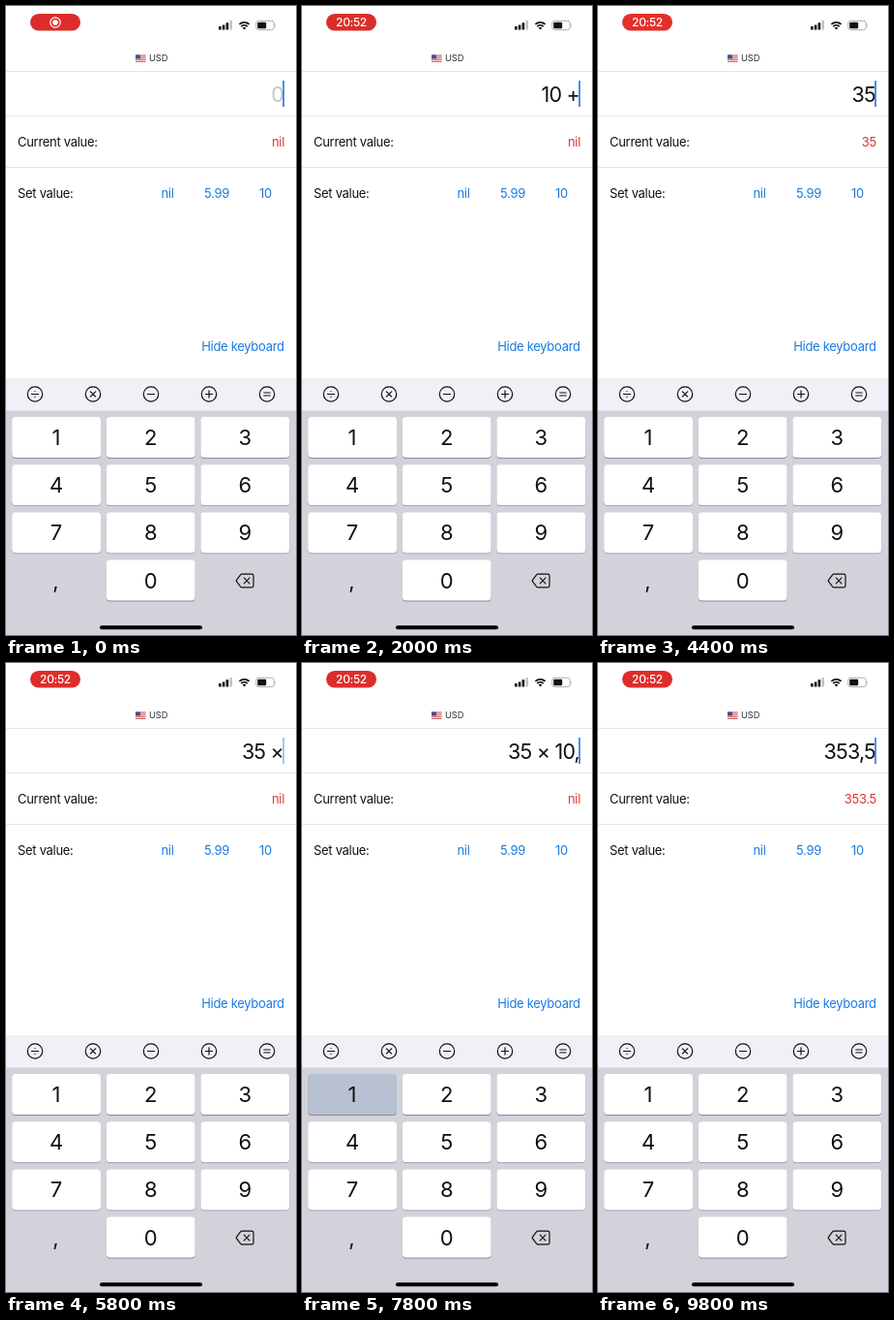
An HTML page that plays this animation: 300 by 649 pixels, repeating every 10 s.

```html
<!DOCTYPE html>
<html lang="en">
<head>
<meta charset="utf-8">
<title>Currency field</title>
<style>
  html, body { margin: 0; width: 100%; height: 100%; overflow: hidden; background: #fff; }
  svg { display: block; width: 100%; height: 100%; }
  text { font: 13px Inter, "Liberation Sans", sans-serif; letter-spacing: -.3px; fill: #111; }
  .end { text-anchor: end; }
  .mid, .key { text-anchor: middle; }
  .link { fill: #187be0; }
  .red { fill: #dd3530; }
  #amount { font-size: 21.5px; letter-spacing: -.8px; }
  .key { font-size: 22px; letter-spacing: 0; }
  #clock { font-size: 12px; font-weight: 500; fill: #fff; }
  .icon { fill: none; stroke: #111; stroke-width: 1.2; stroke-linecap: round; stroke-linejoin: round; }
</style>
</head>
<body>
<svg viewBox="0 0 300 649">
  <rect id="pill" x="25" y="8" width="52" height="17.5" rx="8.75"/>
  <g id="recording">
    <circle cx="51" cy="17" r="5.2" fill="none" stroke="#fff" stroke-width="1.2"/>
    <circle cx="51" cy="17" r="2.8" fill="#fff"/>
  </g>
  <text id="clock" class="mid" x="51" y="21.3">20:52</text>

  <g fill="#111">
    <path d="M220 21h2.6v3.5h-2.6zM223.8 19.4h2.6v5.1h-2.6zM227.6 17.2h2.6v7.3h-2.6z"/>
    <path d="M231.4 15h2.6v9.5h-2.6z" fill="#c4c4c6"/>
    <path d="M246.5 24.6l-1.9-2a2.8 2.8 0 0 1 3.8 0z"/>
    <rect x="260.2" y="16.7" width="9" height="6.6" rx="1.2"/>
    <path d="M278.3 18.4q1.6 1.6 0 3.2z" fill="#999"/>
  </g>
  <g fill="none" stroke="#111">
    <path d="M241.4 18.9a7.4 7.4 0 0 1 10.2 0M243.3 21.1a4.7 4.7 0 0 1 6.4 0" stroke-width="1.7"/>
    <rect x="258.8" y="15.3" width="18.4" height="9.4" rx="2.6" stroke="#999" stroke-width=".8"/>
  </g>

  <rect x="134" y="50.5" width="10.6" height="7.2" rx=".6" fill="#f5f0f0"/>
  <path d="M134 51h10.6M134 53.1h10.6M134 55.2h10.6M134 57.3h10.6" stroke="#d8474b" stroke-width="1"/>
  <rect x="134" y="50.5" width="5" height="4" fill="#3f5596"/>
  <text x="148" y="57.4" style="font-size:9.3px;letter-spacing:-.1px;fill:#333">USD</text>

  <path d="M0 67.5h300M0 113.5h300M0 166.5h300" stroke="#e6e6e8"/>
  <text id="amount" class="end" x="287" y="98.6"></text>
  <rect id="caret" x="286.2" y="77" width="1.7" height="27" fill="#2f7de0"/>
  <text x="12" y="145">Current value:</text>
  <text id="value" class="end red" x="288" y="145"></text>
  <text x="12" y="198">Set value:</text>
  <text class="mid link" x="167" y="198">nil</text>
  <text class="mid link" x="218" y="198">5.99</text>
  <text class="mid link" x="268.5" y="198">10</text>
  <text class="end link" x="287.7" y="356">Hide keyboard</text>

  <rect y="384" width="300" height="34" fill="#f1f0f7"/>
  <rect y="417.5" width="300" height="231.5" fill="#d2d3da"/>
  <g id="operators" class="icon"></g>
  <g id="keys"></g>
  <text class="key" x="51.5" y="601">,</text>
  <path class="icon" d="M244 586.2h10.2q1.8 0 1.8 1.8v10q0 1.8-1.8 1.8H244q-.8 0-1.4-.7l-4-5.2q-.7-.9 0-1.8l4-5.2q.6-.7 1.4-.7zM246.3 590.2l5.6 5.6M251.9 590.2l-5.6 5.6"/>
  <rect x="97" y="639.3" width="106" height="4" rx="2" fill="#000"/>
</svg>
<script>
const LOOP = 10000, STEP = 200, PRESS = 200, CLOCK_AT = 2000;

// [time, field text, current value]
const entries = [
  [0, '', 'nil'], [400, '1', '1'], [1200, '10', '10'], [1800, '10 +', 'nil'],
  [2800, '10 + 2', 'nil'], [3400, '10 + 25', 'nil'], [4400, '35', '35'],
  [5250, '35 ×', 'nil'], [6200, '35 × 1', 'nil'], [6400, '35 × 10', 'nil'],
  [7300, '35 × 10,', 'nil'], [8000, '35 × 10,1', 'nil'], [8800, '353,5', '353.5']
];
// [time, digit]
const presses = [[200, 1], [1000, 0], [2600, 2], [6000, 1], [6200, 0], [7800, 1]];

const $ = id => document.getElementById(id);

const signs = [
  'M-3.6 0h7.2M0-2.9v.1M0 2.8v.1',
  'M-2.7-2.7l5.4 5.4M2.7-2.7l-5.4 5.4',
  'M-3.6 0h7.2',
  'M-3.6 0h7.2M0-3.6v7.2',
  'M-3.2-1.5h6.4M-3.2 1.5h6.4'
];
$('operators').innerHTML = signs.map((d, i) =>
  `<g transform="translate(${30 + 60 * i} 400.5)"><circle r="7.7"/><path d="${d}"/></g>`).join('');

$('keys').innerHTML = [1, 2, 3, 4, 5, 6, 7, 8, 9, 0].map((digit, i) => {
  const x = 6.2 + 97.6 * (digit ? i % 3 : 1), y = 424 + 49.2 * Math.floor(i / 3);
  const box = `x="${x}" width="91.8" height="42" rx="4"`;
  return `<rect ${box} y="${y + 0.9}" fill="#8c8d92"/><rect ${box} y="${y}" id="key${digit}"/>` +
    `<text class="key" x="${x + 45.9}" y="${y + 29}">${digit}</text>`;
}).join('');

function caretOpacity(age) {
  const phase = age % 1000;
  if (phase < 500) return 1;
  if (phase < 600) return (600 - phase) / 100;
  return phase < 900 ? 0 : (phase - 900) / 100;
}

function draw(now) {
  const t = Math.floor(now % LOOP / STEP) * STEP;
  const [since, text, value] = entries.filter(e => e[0] <= t).pop();
  $('amount').textContent = text || '0';
  $('amount').style.fill = text ? '#111' : '#c5c5c8';
  $('value').textContent = value;
  $('caret').setAttribute('opacity', caretOpacity(t - since));

  for (let digit = 0; digit < 10; digit++) {
    const down = presses.some(([at, d]) => d === digit && t >= at && t < at + PRESS);
    $('key' + digit).setAttribute('fill', down ? '#b8c1d1' : '#fff');
  }

  const glow = (1 - Math.cos(t / 2000 * 2 * Math.PI)) / 2;
  $('pill').setAttribute('fill', `rgb(${220 + 24 * glow}, ${45 + 5 * glow}, ${42 + 4 * glow})`);
  $('recording').setAttribute('opacity', t < CLOCK_AT ? 1 : 0);
  $('clock').setAttribute('opacity', t < CLOCK_AT ? 0 : 1);
}

const start = performance.now();
function tick() {
  draw(performance.now() - start);
  requestAnimationFrame(tick);
}
tick();
</script>
</body>
</html>
```
